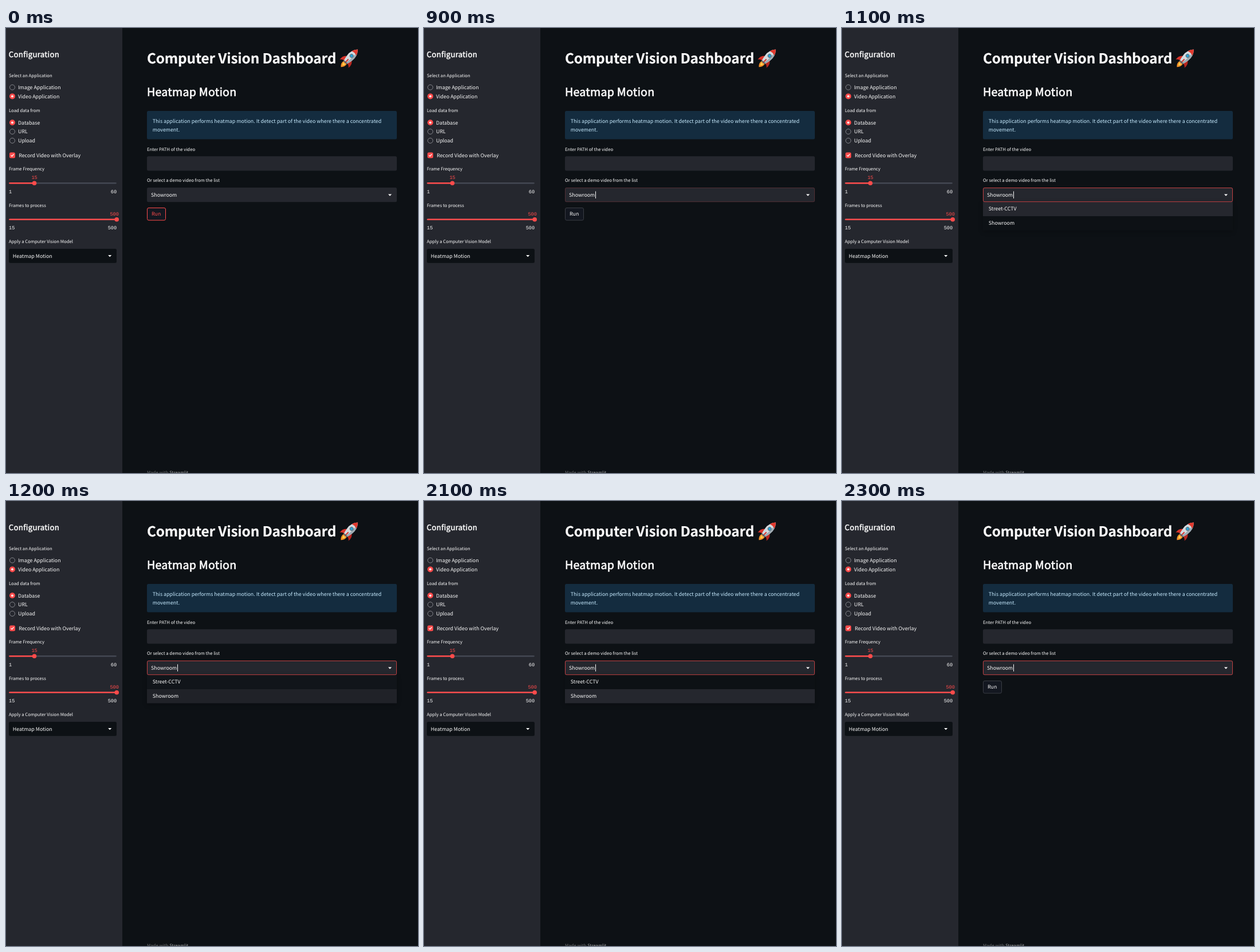
Write an HTML page that moves like this. It is 719 px wide and 778 px high and loops after 8 s.

```html
<!DOCTYPE html>
<html lang="en">
<head>
<meta charset="utf-8">
<title>Computer Vision Dashboard</title>
<style>
  html, body { margin: 0; width: 100%; height: 100%; overflow: hidden; background: #0d1115; }
  svg { display: block; width: 100vw; height: 100vh; }
  text {
    font: 400 8.85px "Noto Sans CJK JP", "Noto Sans CJK SC", "Noto Sans CJK", "Noto Sans", sans-serif;
    fill: #fafafa; white-space: pre; text-rendering: geometricPrecision;
  }
  .label { font-size: 7.73px; }
  .title { font-size: 24.3px; font-weight: 700; letter-spacing: -.15px; stroke: #fafafa; stroke-width: .2px; }
  .head { font-size: 19.6px; letter-spacing: .27px; stroke: #fafafa; stroke-width: .7px; }
  .side { font-size: 13.2px; letter-spacing: .3px; stroke: #fafafa; stroke-width: .5px; }
  .info { fill: #c7ebff; }
  .mono { font-family: "Liberation Mono", "DejaVu Sans Mono", monospace; font-size: 8.7px; }
  .red { fill: #ff4b4b; }
  .faint { opacity: .4; }
  .dim { opacity: .62; }
  .end { text-anchor: end; }
  .mid { text-anchor: middle; }
  .panel { fill: #25272e; }
  .base { fill: #0d1115; }
</style>
</head>
<body>
<svg id="stage" viewBox="0 0 719 778" preserveAspectRatio="none">
  <defs>
    <filter id="soft" x="-10%" y="-50%" width="120%" height="200%"><feGaussianBlur stdDeviation="4"/></filter>
  </defs>
  <rect class="base" width="719" height="778"/>
  <rect class="panel" width="203" height="778"/>
  <g id="sidebar"></g>
  <g id="main"></g>

  <g transform="translate(599.7 52.3) rotate(44)">
    <path d="M-3.6 11Q-5.5 17 0 22Q5.5 17 3.6 11Z" fill="#f79329"/>
    <path d="M-1.8 11Q-2.6 15 0 18Q2.6 15 1.8 11Z" fill="#ffd54f"/>
    <path d="M-4.5 0Q-12 4-10.5 14Q-8 10-3.5 10Z" fill="#d7342b"/>
    <path d="M4.5 0Q12 4 10.5 14Q8 10 3.5 10Z" fill="#b7261f"/>
    <path d="M0-20.5Q8-12 6.3 0Q5.6 6 3.8 11H-3.8Q-5.6 6-6.3 0Q-8-12 0-20.5Z" fill="#d3dbe0"/>
    <path d="M2-18Q8-11 6.3 0Q5.6 6 3.8 11H1Q4-4 2-18Z" fill="#9eabb3"/>
    <path d="M0-20.5Q4.3-16 5.7-11Q0-13.4-5.7-11Q-4.3-16 0-20.5Z" fill="#e0392e"/>
    <circle cy="-5" r="3.5" fill="#64767f"/>
    <circle cy="-5" r="2.3" fill="#29a3d8"/>
    <path d="M-1 3H1V13H-1Z" fill="#d7342b"/>
    <path d="M-3.8 9.4H3.8V11.6H-3.8Z" fill="#57656d"/>
  </g>

  <g id="run">
    <rect id="runBox" x="246.5" y="314.5" width="32" height="21.6" rx="2.5" fill="#131720"/>
    <text id="runText" class="mid" x="262.2" y="328.3">Run</text>
  </g>

  <g id="menu">
    <rect x="246" y="306" width="436" height="50" opacity=".25" filter="url(#soft)"/>
    <rect class="base" x="246" y="304" width="436" height="50"/>
    <rect id="row1" class="panel" x="246" y="304" width="436" height="25"/>
    <rect id="row2" class="panel" x="246" y="329" width="436" height="24.5"/>
    <text x="255.8" y="319.3">Street-CCTV</text>
    <text x="255.8" y="344.3">Showroom</text>
  </g>
  <rect id="focus" x="246.5" y="279.5" width="435" height="24.2" rx="2.3" fill="none" stroke="#ff4b4b"/>
  <rect id="caret" x="299" y="285.5" width="1" height="12.5" fill="#fafafa"/>
</svg>
<script>
const $ = id => document.getElementById(id);
const LOOP = 8000, STEP = 100;
const PANEL = '#25272e', BASE = '#0d1115', RED = '#ff4b4b';

const text = (x, y, str, cls = '') => `<text x="${x}" y="${y}" class="${cls}">${str}</text>`;
const box = (x, y, w, h, fill) => `<rect x="${x}" y="${y}" width="${w}" height="${h}" rx="2.5" fill="${fill}"/>`;
const arrow = (x, y) => `<path d="M${x - 3.1} ${y - 1.5}h6.2l-3.1 3.3z" fill="#fafafa"/>`;

function radio(y, label, on) {
  const mark = on
    ? `<circle cx="11" cy="${y}" r="5" fill="${RED}"/><circle cx="11" cy="${y}" r="1.9" fill="#fff"/>`
    : `<circle cx="11" cy="${y}" r="4.5" fill="${PANEL}" stroke="#85868c"/>`;
  return mark + text(21, y + 3.2, label);
}

function slider(y, x, valueX, value, min, max) {
  return box(5, y - 1.2, 188, 2.4, '#444853') + box(5, y - 1.2, x - 5, 2.4, RED) +
    `<circle cx="${x}" cy="${y}" r="3.8" fill="${RED}"/>` +
    text(valueX, y - 7.2, value, 'mono red mid') +
    text(5, y + 17.3, min, 'mono') + text(193.3, y + 17.3, max, 'mono end');
}

$('sidebar').innerHTML = [
  text(4.8, 51.3, 'Configuration', 'side'),
  text(5, 86, 'Select an Application', 'label'),
  radio(103.7, 'Image Application', false),
  radio(119.4, 'Video Application', true),
  text(5, 147.3, 'Load data from', 'label'),
  radio(165.3, 'Database', true),
  radio(181.1, 'URL', false),
  radio(196.9, 'Upload', false),
  box(6, 217.4, 10, 10, RED),
  '<path d="M8.6 222.4l1.8 1.9 3.1-3.8" fill="none" stroke="#fff" stroke-width="1.3"/>',
  text(22.2, 225.5, 'Record Video with Overlay'),
  text(5, 249.4, 'Frame Frequency', 'label'),
  slider(271.2, 49.5, 49.6, '15', '1', '60'),
  text(5, 312.8, 'Frames to process', 'label'),
  slider(334.8, 193.2, 189.2, '500', '15', '500'),
  text(5, 376, 'Apply a Computer Vision Model', 'label'),
  box(5, 386, 188, 24.8, BASE),
  text(11.8, 401.8, 'Heatmap Motion'),
  arrow(181.2, 398.5)
].join('');

$('main').innerHTML = [
  text(246, 62, 'Computer Vision Dashboard', 'title'),
  text(246, 118.8, 'Heatmap Motion', 'head'),
  box(246, 145, 436, 49.4, '#142c3f'),
  text(255.8, 165.8, 'This application performs heatmap motion. It detect part of the video where there a concentrated', 'info'),
  text(255.8, 180.7, 'movement.', 'info'),
  text(246, 214.8, 'Enter PATH of the video', 'label'),
  box(246, 224.3, 436, 25.3, PANEL),
  text(246, 269.4, 'Or select a demo video from the list', 'label'),
  box(246, 279, 436, 25.3, PANEL),
  text(253, 295.3, 'Showroom'),
  arrow(670, 292),
  text(246, 779.8, 'Made with', 'label faint'),
  text(285.2, 779.8, 'Streamlit', 'label dim')
].join('');

const show = (id, alpha) => $(id).setAttribute('opacity', alpha);
// Value of the last key whose time has been reached.
const held = (t, keys) => keys.reduce((v, [at, next]) => t >= at ? next : v, 0);

function render(time) {
  const t = Math.floor(time % LOOP / STEP) * STEP;
  const hot = t < 500;
  $('runBox').setAttribute('stroke', hot ? RED : '#3a3d44');
  $('runText').style.fill = hot ? RED : '#fafafa';
  show('focus', held(t, [[900, .2], [1000, .6], [1100, .72]]));
  show('caret', held(t, [[900, 1], [1500, 0], [2100, 1]]));
  show('menu', held(t, [[1000, .5], [1100, 1], [2200, .5], [2300, 0]]));
  const shift = held(t, [[1200, .8], [1300, 1]]);
  show('row1', 1 - shift);
  show('row2', shift);
}

const start = performance.now();
function tick() {
  render(performance.now() - start);
  requestAnimationFrame(tick);
}
render(0);
requestAnimationFrame(tick);
</script>
</body>
</html>
```
